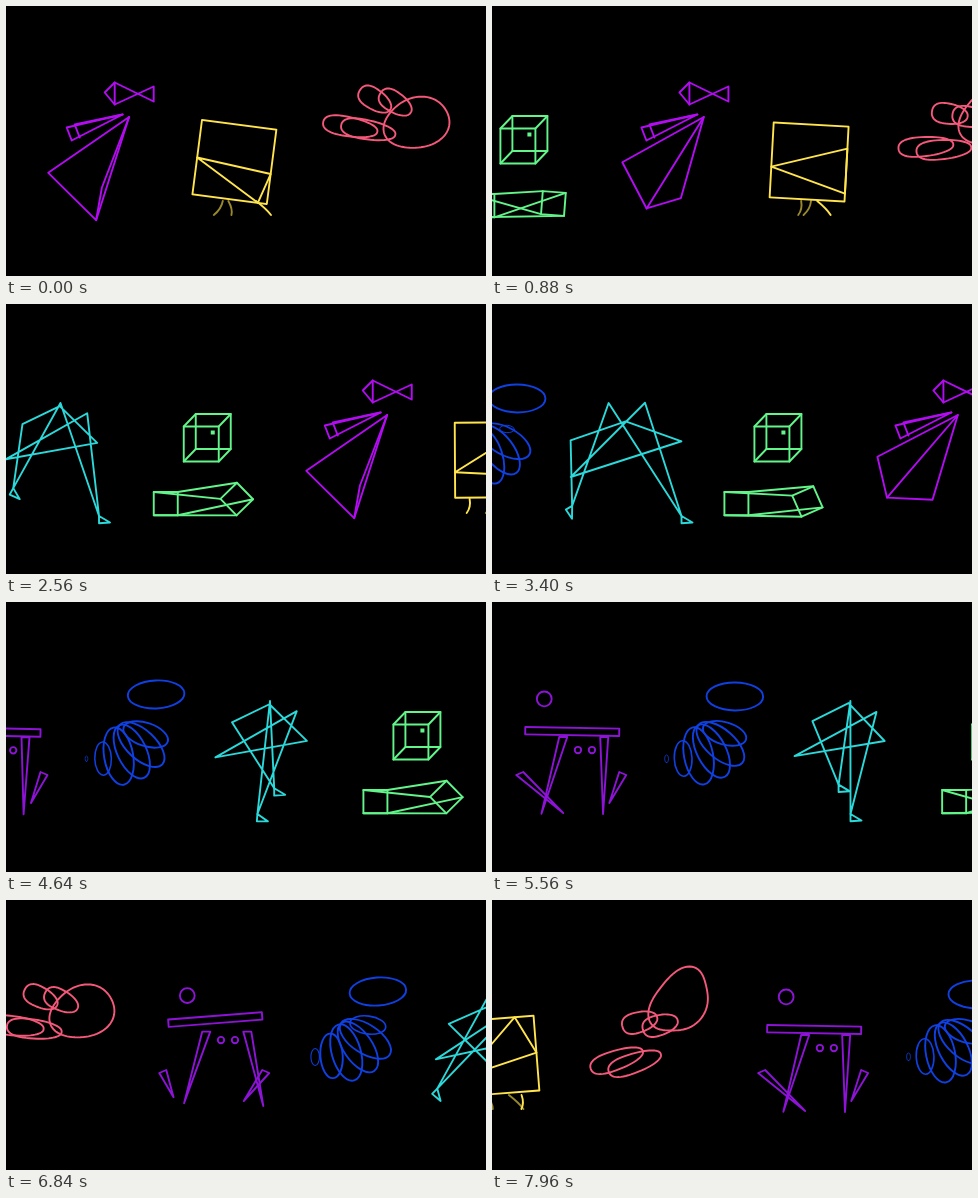
These frames come from a looping animation (480 by 270 pixels, 8000 ms). An HTML page with a canvas:

```html
<!DOCTYPE html>
<html lang="en">
<head>
<meta charset="utf-8">
<title>Walking shapes</title>
<style>
  html, body { margin: 0; width: 100%; height: 100%; overflow: hidden; background: #000; }
  canvas { display: block; width: 480px; height: 270px; }
</style>
</head>
<body>
<canvas id="stage"></canvas>
<script>
const LOOP = 8000, SPEED = 0.1008, SPACING = 1023.7, CYCLE = 960, STEP = CYCLE / 2;
const canvas = document.getElementById('stage');
const ctx = canvas.getContext('2d');
const ratio = Math.max(1, window.devicePixelRatio || 1);
canvas.width = 480 * ratio;
canvas.height = 270 * ratio;

const { PI, sin, cos, min, max, floor, abs } = Math;
const frac = v => v - floor(v);
const rad = deg => deg * PI / 180;
const wave = phase => cos(2 * PI * phase);
const swell = phase => (1 - wave(phase)) / 2;
const around = (count, make) => Array.from({ length: count }, (_, i) => make(i * 2 * PI / count));

function line(points, closed) {
  ctx.beginPath();
  points.forEach(([x, y]) => ctx.lineTo(x, y));
  if (closed) ctx.closePath();
  ctx.stroke();
}

function oval(x, y, rx, ry = rx, deg = 0) {
  ctx.beginPath();
  ctx.ellipse(x, y, rx, ry, rad(deg), 0, 2 * PI);
  ctx.stroke();
}

function turned(x, y, deg, paint) {
  ctx.save();
  ctx.translate(x, y);
  ctx.rotate(rad(deg));
  paint();
  ctx.restore();
}

// A rounded pad, blunt on the left and slimmer on the right.
function pad(x, y, rx, ry, deg) {
  turned(x, y, deg, () => line(around(60, a => [
    rx * Math.sign(cos(a)) * abs(cos(a)) ** 0.85,
    ry * (1 - 0.18 * cos(a)) * Math.sign(sin(a)) * abs(sin(a)) ** 0.85
  ]), true));
}

function blob(t) {
  const beat = t / STEP, k = swell(beat - 0.1);
  const headX = 31 - 2 * k, headY = 114 - 9.5 * k + 4 * wave(beat);
  line(around(72, a => {
    const r = 1 + (0.03 + 0.05 * k) * cos(3 * (a + PI / 2));
    const up = -sin(a) * r;
    return [headX + (33 - 5 * k) * cos(a) * r + (4 + 5 * k) * up, headY - (25 + 7 * k) * up];
  }), true);
  for (const i of [0, 1]) {
    pad(-11 + 20.5 * i, 91 + 31 * k + 3 * i, 18, 10, 38 - 54 * k);
    pad(-36 + 2 * k + 18 * i, 117 + 43 * k + 3 * i, 27.5, 9.5, 13 - 32 * k);
  }
}

// Point on the edge of a square, counted in sides clockwise from the top right.
function onSquare(p, half) {
  const d = half * (2 * frac(p) - 1);
  return [[half, d], [-d, half], [-half, -d], [d, -half]][floor(p + 4) % 4];
}

function stilt(phase, middle, reach) {
  const hip = middle + reach * wave(phase - 0.15), foot = hip + 3 + 12 * wave(phase);
  ctx.beginPath();
  ctx.moveTo(hip, 39);
  ctx.quadraticCurveTo((hip + foot) / 2 + 3, 47, foot, 53);
  ctx.stroke();
}

function box(t) {
  const walk = t / CYCLE, k = swell(t / STEP - 0.04);
  turned(0, 156, 0, () => {
    stilt(walk, 5, 28);
    ctx.globalAlpha = 0.6;
    stilt(walk + 0.5, 5, 28);
    stilt(walk - 0.25, 2, 10);
  });
  turned(0, 156, 7.5 - 12.2 * k, () => {
    ctx.strokeRect(-37.5, -37.5, 75, 75);
    line([0.61 - 0.88 * k, 1.13 - 0.65 * k, 2.5 - 0.25 * k].map(p => onSquare(p, 37.5)), true);
  });
}

function bird(t) {
  turned(0.6, 0.5, 0, () => {
    line([[-25, 86], [-15, 76], [24, 95], [24, 80], [-15, 98]], true);
    line([[-15, 76], [-15, 98]]);
    line([[-7, 108], [-63, 121], [-58, 134]], true);
    line([[-7, 108], [-55, 118], [-50, 131]]);
  });
  // Three hem points circle under the tip; the gap in the hem faces the tip.
  const sway = wave(t / 320), tip = [0, 111];
  const first = 140 + 120 * frac((18 - 360 * t / CYCLE) / 120);
  const hem = [0, 120, 240].map(step => {
    const angle = first - step;
    return [-54 + 34 * cos(rad(angle + 28)) + 7 * sway, 183.5 + 28 * cos(rad(angle - 20)) + 4 * sway];
  });
  line([tip, ...hem], true);
  line([tip, hem[1]]);
}

function cubeSlug(t) {
  const front = [[0, 122.5], [35, 122.5], [35, 157.5], [0, 157.5]];
  const back = front.map(([x, y]) => [x + 12, y - 12.5]);
  line(front, true);
  line(back, true);
  front.forEach((p, i) => line([p, back[i]]));
  ctx.fillRect(27, 126.5, 4, 4);

  // A square wheel rolls in front and stays joined to the tail corners.
  const turn = frac((45 + 0.346 * (t - 4640)) / 90) * 90 - 45;
  const axle = 195 + 2.5 * min(1, abs(turn) / 21);
  const wheel = [270, 0, 90, 180].map(a => [53 + 16.3 * cos(rad(a + turn)), axle + 16.3 * sin(rad(a + turn))]);
  const tail = [[-6, 188], [-6, 211.3], [-30, 211.3], [-30, 188]];
  line(tail, true);
  line(wheel, true);
  tail.forEach((p, i) => line([p, wheel[i]]));
}

function shoe(phase) {
  const x = -4 + 55 * wave(phase - 0.06);
  const y = 212 - 31 * max(0, sin(2 * PI * (phase - 0.49)));
  const pitch = 60 * max(0, wave(phase - 0.54)) ** 2;
  turned(x, y, pitch, () => line([[0, 0], [11, 6.5], [0, 7.3]], true));
  return [x, y];
}

function strider(t) {
  const walk = t / CYCLE, k = (1 - swell(t / STEP)) ** 2;
  const joint = (x, y, dx, dy) => [x + dx * k, y + dy * k];
  line([
    shoe(walk),
    joint(-36, 119, -28, 20), joint(0, 101, -6, 19), joint(36, 139, 17, -2),
    joint(-54, 154, -7, 22), joint(28, 110, -16, -13),
    shoe(walk + 0.5),
    joint(2, 99, -28, 0)
  ], true);
}

function slinky(t) {
  const bob = wave(t / 240);
  oval(0, 93.5 + 2 * bob, 28.3, 14, -1 + 3 * bob);
  // Rings swell at the top, swing down a quarter arc and fade out.
  for (let s = frac(t / STEP - 0.27) - 1; s < 5.6; s++) {
    const r = 29 * min(1, 0.66 + 0.35 * s, 0.66 + 2.2 * s, (5.6 - s) / 2.1);
    if (r <= 0) continue;
    const arc = s * PI / 10, drop = max(0, sin(arc));
    ctx.lineWidth = min(1.9, 0.5 + r / 16);
    oval(-10 - 53 * (1 - cos(arc)), 125 + 32 * drop ** 0.7, r, r / 2, 8 + 82 * sin(arc));
  }
}

function table(t) {
  const beat = t / STEP, w = wave(beat - 0.15);
  const hip = 133.2 - 2 * w, eyes = 143.8 - 4.6 * w;
  oval(0, 96.2 - 0.8 * w, 7.4);
  oval(33.7, eyes, 3.2);
  oval(47.7, eyes, 3.2);
  turned(28, 124.2 - 5.8 * w, -1.9 - 3.2 * w, () => ctx.strokeRect(-47, -3.7, 94, 7.4));
  line([[15, hip], [23, hip], [7 + 20 * wave(beat + 0.083), 207.2 - 5 * w]], true);
  line([[56, hip], [64, hip], [68 + 10 * w, 208.8 - 3.5 * w]], true);
  line([[-28, 173], [-21, 170], [1.5 - 19 * w, 203.6 - 8 * w]], true);
  line([[75, 170], [82, 173], [60.5 - 5 * w, 201]], true);
}

const FIGURES = [
  [blob, 380, '#f4587a'], [box, 228.3, '#ffe44d'], [bird, 123, '#b30cf2'], [cubeSlug, -80.4, '#62f58a'],
  [strider, -204, '#2bd9da'], [slinky, -317.7, '#1040e2'], [table, -508.3, '#8d14d6']
];

function draw(t) {
  ctx.setTransform(ratio, 0, 0, ratio, 0, 0);
  ctx.fillStyle = '#000';
  ctx.fillRect(0, 0, 480, 270);
  ctx.lineJoin = ctx.lineCap = 'round';
  for (const [figure, start, color] of FIGURES) {
    for (const lap of [0, 1]) {
      const x = start + SPEED * t - lap * SPACING;
      if (x < -130 || x > 610) continue;
      ctx.strokeStyle = ctx.fillStyle = color;
      ctx.lineWidth = 1.9;
      turned(x, 0, 0, () => figure(t));
    }
  }
}

const began = performance.now();
function tick() {
  draw((performance.now() - began) % LOOP);
  requestAnimationFrame(tick);
}
tick();
</script>
</body>
</html>
```
